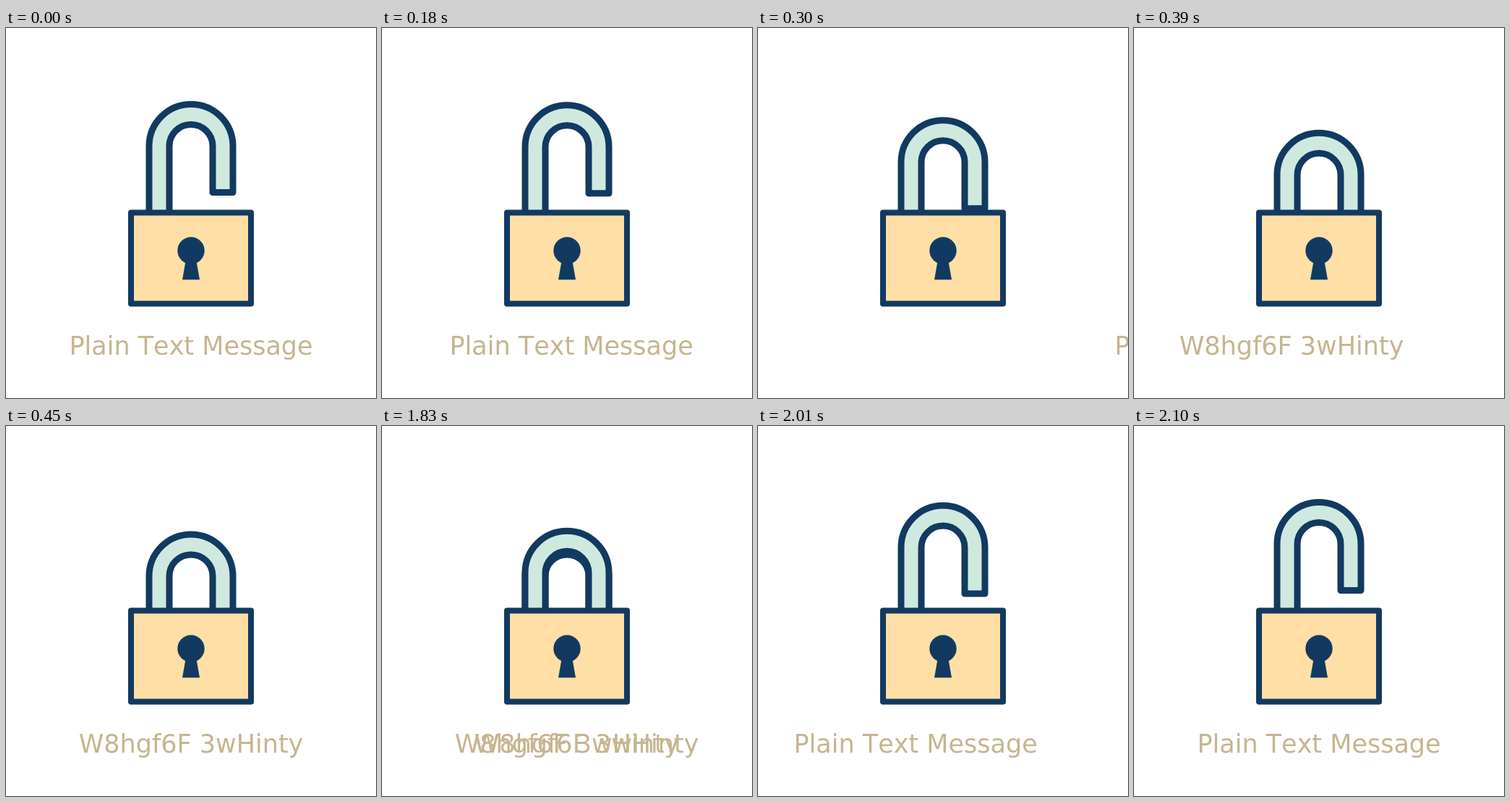
Animation, 512 px wide and 512 px high, one loop 2.7 s. Source, as an HTML page:

```html
<!DOCTYPE html>
<html lang="en">
<head>
<meta charset="utf-8">
<title>Padlock</title>
<style>
  html, body { margin: 0; width: 100%; height: 100%; overflow: hidden; background: #fff; }
  svg { display: block; width: 100%; height: 100%; }
  .line { stroke: #123a60; stroke-linejoin: round; }
  text {
    font: 35px "DejaVu Sans", Verdana, sans-serif;
    font-kerning: none;
    text-anchor: middle;
    fill: #c5b590;
  }
</style>
</head>
<body>
<svg viewBox="0 0 512 512">
  <defs>
    <path id="arch" class="line" fill="#cfe9df" stroke-width="9"
      d="M198 300V163.5A58 58 0 0 1 314 163.5V227.5H286V163.5A30 30 0 0 0 226 163.5V300Z"/>
  </defs>
  <g id="trail">
    <use href="#arch" y="44.4"/>
    <text x="256" y="452">W8hgf6F 3wHinty</text>
  </g>
  <use id="shackle" href="#arch"/>
  <rect class="line" x="173" y="255.5" width="166" height="126" fill="#ffdfa5" stroke-width="8"/>
  <g fill="#123a60">
    <circle cx="256" cy="308" r="18.7"/>
    <path d="M249 320H263L268 348.3H244Z"/>
  </g>
  <text id="plain" x="256" y="452">Plain Text Message</text>
  <text id="cipher" x="256" y="452">W8hgf6F 3wHinty</text>
</svg>
<script>
const LOOP = 2700, STEP = 30, CLOSE = 180, OPEN = 1830, DROP = 44.4, ENTER = 430;
const get = id => document.getElementById(id);
const shackle = get('shackle'), trail = get('trail');

// Each text leaves to the right, speeding up along its own curve.
const plain = { el: get('plain'), reach: 406, power: 2.61 };
const cipher = { el: get('cipher'), reach: 340, power: 2.76 };

const smooth = x => x * x * (3 - 2 * x);

function place(text, x) {
  text.el.setAttribute('transform', `translate(${x.toFixed(2)} 0)`);
}

// Ten steps: one text accelerates out right, the other brakes in from the left.
function swap(from, to, step) {
  place(from, step > 7 ? 700 : from.reach * (step / 5) ** from.power);
  place(to, step < 5 ? -700 : -ENTER * ((10 - step) / 5) ** 2.65);
}

function stepAt(t, start, lead) {
  return t < start ? 0 : Math.min(10, Math.floor((t - start) / STEP) + lead);
}

function draw(t) {
  const closing = stepAt(t, CLOSE, 1);
  const opening = stepAt(t, OPEN, 2);
  const shut = opening ? 1 - smooth(opening / 10) : smooth(closing / 10);
  shackle.setAttribute('transform', `translate(0 ${(DROP * shut).toFixed(2)})`);
  if (opening) swap(cipher, plain, opening);
  else swap(plain, cipher, closing);
  // The closed pose lingers for the first opening step.
  trail.style.display = opening === 2 ? '' : 'none';
}

const begin = performance.now();
function tick() {
  draw((performance.now() - begin) % LOOP);
  requestAnimationFrame(tick);
}
tick();
</script>
</body>
</html>
```
